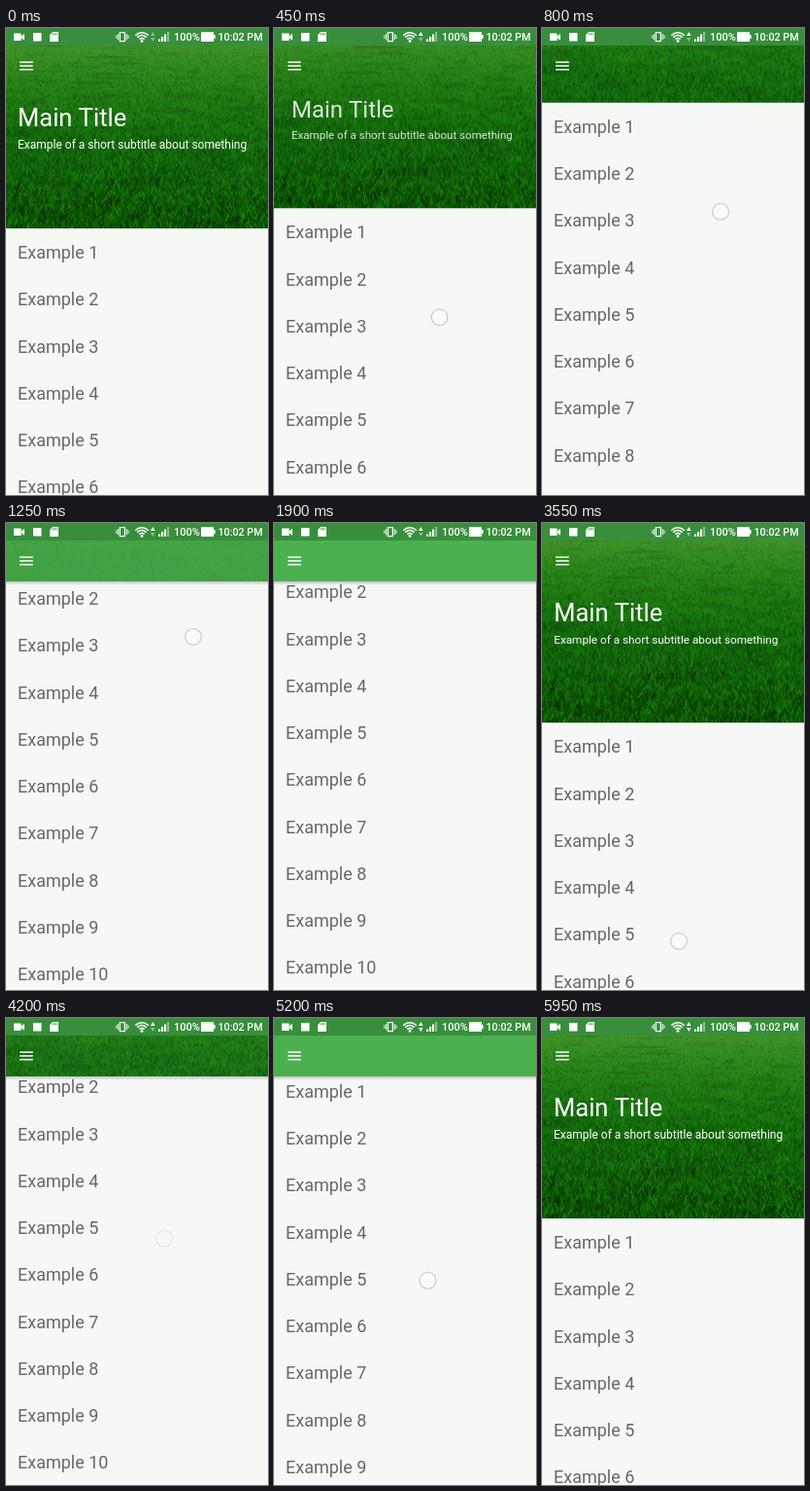
Animation, 270 px wide and 480 px high, one loop 6000 ms. Source, as an HTML page with a canvas:

```html
<!DOCTYPE html>
<html lang="en">
<head>
<meta charset="utf-8">
<title>Collapsing header</title>
<style>
html, body { margin: 0; width: 100%; height: 100%; overflow: hidden; background: #f5f8f5; }
canvas { display: block; width: 270px; height: 480px; }
</style>
</head>
<body>
<canvas id="stage"></canvas>
<script>
const W = 270, H = 480, LOOP = 6000;
const BAR = 18, TOOLBAR = 60, HEADER = 206, ROW = 48.25, ITEMS = 10;
const RANGE = HEADER - TOOLBAR;
const FONT = 'Roboto, Arial, sans-serif';
const dpr = window.devicePixelRatio || 1;

function makeCanvas(canvas, w, h) {
  canvas.width = w * dpr;
  canvas.height = h * dpr;
  const c = canvas.getContext('2d');
  c.scale(dpr, dpr);
  return c;
}
const stage = document.getElementById('stage');
const ctx = makeCanvas(stage, W, H);

const clamp = (v, a = 0, b = 1) => Math.min(b, Math.max(a, v));
const lerp = (a, b, k) => a + (b - a) * k;

// Scroll distance over time: [ms, px]
const SCROLL = [
  [0, 0], [330, 0], [550, 50], [720, 106], [800, 129], [1250, 201], [1400, 208],
  [1900, 208], [2150, 104], [2370, 0], [3500, 0], [3550, 0.7], [3800, 25],
  [4020, 106], [4180, 208], [4950, 208], [5340, 104], [5520, 0], [6000, 0]
];

// Monotone cubic through the given points
function curve(pts, t) {
  const slope = i => (pts[i + 1][1] - pts[i][1]) / (pts[i + 1][0] - pts[i][0]);
  const tangent = i => {
    if (i === 0 || i === pts.length - 1) return 0;
    const a = slope(i - 1), b = slope(i);
    return a * b <= 0 ? 0 : 2 * a * b / (a + b);
  };
  let i = 0;
  while (i < pts.length - 2 && t >= pts[i + 1][0]) i++;
  const [x0, y0] = pts[i], [x1, y1] = pts[i + 1];
  const w = x1 - x0, u = (t - x0) / w, v = 1 - u;
  return y0 * (1 + 2 * u) * v * v + tangent(i) * w * u * v * v
    + y1 * u * u * (3 - 2 * u) - tangent(i + 1) * w * u * u * v;
}

function bezier(x1, y1, x2, y2) {
  const at = (a, b, u) => 3 * (1 - u) * (1 - u) * u * a + 3 * (1 - u) * u * u * b + u * u * u;
  return x => {
    let lo = 0, hi = 1;
    for (let i = 0; i < 24; i++) {
      const mid = (lo + hi) / 2;
      if (at(x1, x2, mid) < x) lo = mid; else hi = mid;
    }
    return at(y1, y2, lo);
  };
}
const accelerate = bezier(0.4, 0, 1, 1);
const decelerate = bezier(0, 0, 0.2, 1);

function scrim(t) {
  const fade = (on, off) => t < off
    ? accelerate(clamp((t - on) / 600))
    : 1 - decelerate(clamp((t - off) / 600));
  return t < 3000 ? fade(720, 2150) : fade(4030, 5340);
}

// Finger contacts: the y follows the scroll, the x drifts with it
const TOUCHES = [
  { from: 280, to: 1340, y: 318, k: 1, x0: 168, x1: 193 },
  { from: 1920, to: 2500, y: 425, k: 1, x0: 143, x1: 163 },
  { from: 3230, to: 4190, y: 430.5, k: 0.98, x0: 141, x1: 163 },
  { from: 4950, to: 5560, y: 425, k: 1, x0: 143, x1: 163 }
];

function random(seed) {
  return () => {
    seed = (seed + 0x6D2B79F5) | 0;
    let r = Math.imul(seed ^ (seed >>> 15), 1 | seed);
    r = (r + Math.imul(r ^ (r >>> 7), 61 | r)) ^ r;
    return ((r ^ (r >>> 14)) >>> 0) / 4294967296;
  };
}

function makeGrass() {
  const canvas = document.createElement('canvas');
  const c = makeCanvas(canvas, W, HEADER);
  const rnd = random(11);
  const base = c.createLinearGradient(0, BAR, 0, HEADER);
  base.addColorStop(0, '#43932a');
  base.addColorStop(0.2, '#2a8519');
  base.addColorStop(0.5, '#146f0c');
  base.addColorStop(1, '#095206');
  c.fillStyle = base;
  c.fillRect(0, 0, W, HEADER);

  // Broad uneven patches, flatter towards the horizon
  for (let i = 0; i < 260; i++) {
    const d = rnd();
    c.fillStyle = rnd() < 0.55 ? 'rgba(0,45,0,0.10)' : 'rgba(40,170,20,0.07)';
    c.beginPath();
    c.ellipse(rnd() * W, BAR + d * 188, 8 + rnd() * 22, 1 + d * 5, 0, 0, 7);
    c.fill();
  }

  // Blades, drawn from the far edge to the near one
  const blades = 10500;
  c.lineCap = 'round';
  for (let i = 0; i < blades; i++) {
    const d = i / blades;
    const x = rnd() * W, y = BAR + d * 192;
    const len = (0.8 + d * 5) * (0.5 + rnd() * 0.8);
    const spread = 5 + 11 * Math.sqrt(d);
    const light = 31 - 13 * Math.sqrt(d) + (rnd() - 0.5) * 2 * spread;
    c.strokeStyle = `hsla(${108 + rnd() * 10}, ${66 + 18 * d}%, ${Math.max(5, light)}%, 0.62)`;
    c.lineWidth = 0.55 + d * 0.6;
    c.beginPath();
    c.moveTo(x, y);
    c.lineTo(x + (rnd() - 0.5) * len * 1.5, y - len);
    c.stroke();
  }
  return canvas;
}
const grass = makeGrass();

function text(str, x, y, size, color, weight = 400) {
  ctx.font = `${weight} ${size}px ${FONT}`;
  ctx.fillStyle = color;
  ctx.fillText(str, x, y);
}

function poly(color, ...p) {
  ctx.fillStyle = color;
  ctx.beginPath();
  for (let i = 0; i < p.length; i += 2) ctx.lineTo(p[i], p[i + 1]);
  ctx.fill();
}

function rect(color, x, y, w, h) {
  ctx.fillStyle = color;
  ctx.fillRect(x, y, w, h);
}

function drawList(s) {
  for (let i = 0; i < ITEMS; i++) {
    text('Example ' + (i + 1), 12, 237 + i * ROW - s, 18, '#666866');
  }
}

function drawHeader(s, t) {
  const bottom = Math.max(TOOLBAR, HEADER - s);
  const moved = HEADER - bottom, f = moved / RANGE;

  if (f >= 1) {
    const shade = ctx.createLinearGradient(0, bottom, 0, bottom + 4);
    shade.addColorStop(0, 'rgba(0,0,0,0.22)');
    shade.addColorStop(1, 'rgba(0,0,0,0)');
    rect(shade, 0, bottom, W, 4);
  }

  ctx.save();
  ctx.beginPath();
  ctx.rect(0, 0, W, bottom);
  ctx.clip();
  ctx.drawImage(grass, 0, -moved / 2, W, HEADER);
  rect(`rgba(76,175,80,${scrim(t)})`, 0, 0, W, bottom);

  const alpha = clamp(1 - f / 0.85);
  if (alpha > 0) {
    const white = `rgba(255,255,255,${alpha})`;
    const x = lerp(12, 54, f);
    text('Main Title', x, lerp(101, 38, f), lerp(25.5, 15, f), white);
    const small = s > 0.05 ? 11.77 : 12;
    text('Example of a short subtitle about something', x, lerp(124, 52, f), lerp(small, 10.5, f), white);
  }
  for (let i = 0; i < 3; i++) rect('#fff', 14.2, 34.4 + i * 3.8, 13.6, 1.5);
  ctx.restore();
}

function drawWifi(x, y) {
  ctx.strokeStyle = '#fff';
  ctx.lineWidth = 1.5;
  for (const r of [3.6, 6.4, 9.2]) {
    ctx.beginPath();
    ctx.arc(x, y, r, -Math.PI * 0.76, -Math.PI * 0.24);
    ctx.stroke();
  }
  ctx.fillStyle = '#fff';
  ctx.beginPath();
  ctx.arc(x, y - 0.6, 1.4, 0, 7);
  ctx.fill();
}

function drawStatus(t) {
  const on = '#fff', dim = 'rgba(255,255,255,0.42)';
  rect('#388e3c', 0, 0, W, BAR);

  // camera, plain square, memory card
  rect(on, 8, 5.5, 7.6, 7.5);
  poly(on, 15.6, 8.4, 19, 5.8, 19, 12.8, 15.6, 10.2);
  rect(on, 28, 5, 8.5, 8.5);
  poly(on, 48.2, 4, 54, 4, 54, 14, 45.2, 14, 45.2, 7);
  for (let i = 0; i < 3; i++) rect('#388e3c', 48.2 + i * 1.8, 5.2, 0.9, 2.2);

  // vibrate
  ctx.strokeStyle = on;
  ctx.lineWidth = 1.2;
  ctx.strokeRect(117.4, 4.6, 5, 9);
  rect(on, 115, 6, 1, 6.2);
  rect(on, 123.8, 6, 1, 6.2);
  rect(on, 113.3, 7.3, 0.9, 3.6);
  rect(on, 125.6, 7.3, 0.9, 3.6);

  drawWifi(140, 14);

  const up = t >= 400, down = t >= 4700;
  poly(up ? on : dim, 149, 8, 151.3, 4, 153.6, 8);
  poly(down ? on : dim, 149, 10, 153.6, 10, 151.3, 14);

  for (let i = 0; i < 4; i++) {
    const h = 2.5 + i * 2.5;
    rect(i < 3 ? on : dim, 157 + i * 3, 14 - h, 2.1, h);
  }

  text('100%', 173, 13, 11, on, 500);
  rect(on, 201, 4.2, 13, 9.8);
  rect(on, 214, 7, 1.6, 4.2);
  text('10:02 PM', 218.5, 13, 10.7, on, 500);
}

function drawTouch(s, t) {
  for (const p of TOUCHES) {
    if (t < p.from || t > p.to + 40) continue;
    const x = lerp(p.x0, p.x1, clamp(s / 201)), y = p.y - p.k * s;
    ctx.globalAlpha = t > p.to ? 0.35 : 1;
    ctx.beginPath();
    ctx.arc(x, y, 8.4, 0, 7);
    ctx.fillStyle = 'rgba(255,255,255,0.5)';
    ctx.fill();
    ctx.strokeStyle = 'rgba(110,115,110,0.32)';
    ctx.lineWidth = 1.3;
    ctx.stroke();
    ctx.globalAlpha = 1;
  }
}

function draw(t) {
  const s = curve(SCROLL, t);
  rect('#f5f8f5', 0, 0, W, H);
  drawList(s);
  drawHeader(s, t);
  drawStatus(t);
  drawTouch(s, t);
}

const start = performance.now();
function frame() {
  draw((performance.now() - start) % LOOP);
  requestAnimationFrame(frame);
}
frame();
</script>
</body>
</html>
```
